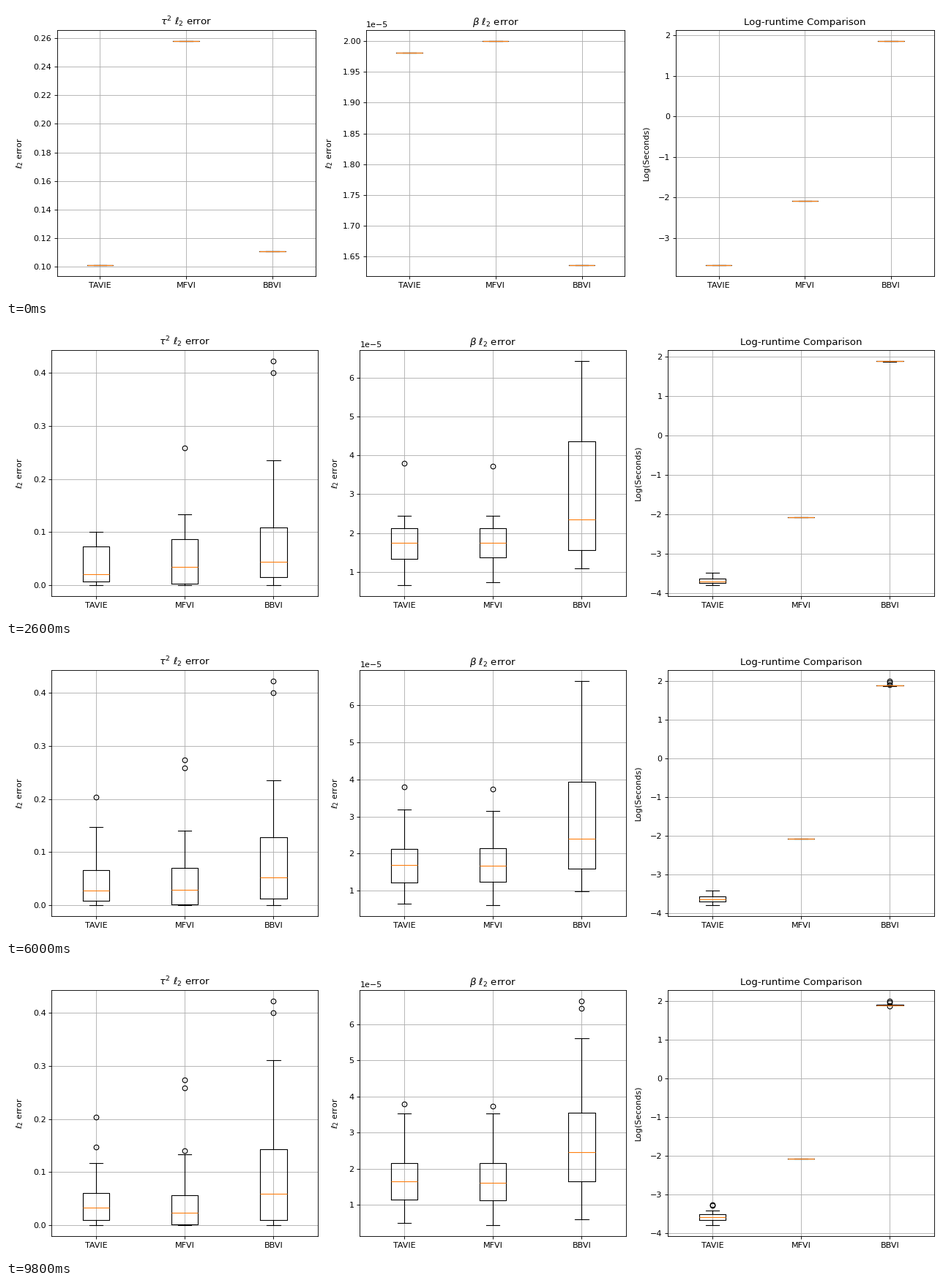
Write a matplotlib script that moves like this. It is 1280 px wide and 400 px high and loops after 10 s.

```python
import matplotlib.pyplot as plt
import numpy as np
from matplotlib.animation import FuncAnimation

FRAMES, INTERVAL = 50, 200
SPREAD_FRAMES = 5  # time a box takes to open up from its first draw
METHODS = ["TAVIE", "MFVI", "BBVI"]

# Each series: first draw, quartiles once opened, quartiles at the end,
# and the extreme draws that arrive on the way as {frame: value}.
TAU = [
    (.1011, (.0055, .016, .078), (.0094, .0325, .061),
     {4: .0002, 17: .2035, 22: .1474, 34: .1163}),
    (.258, (.003, .040, .1005), (.0014, .0228, .0561),
     {3: .1095, 4: .0002, 8: .1329, 17: .2742, 22: .1401}),
    (.111, (.0173, .0375, .0938), (.0091, .0588, .1437),
     {3: .400, 4: .0035, 8: .0005, 9: .4225, 11: .2346, 34: .2854, 43: .3108}),
]
BETA = [
    (1.9815, (1.42, 1.775, 2.10), (1.142, 1.65, 2.152),
     {2: 1.10, 3: 2.138, 4: 3.80, 8: .655, 10: 2.443, 19: 3.191, 34: 3.52, 44: .486}),
    (2.0005, (1.459, 1.80, 2.11), (1.132, 1.602, 2.152),
     {2: 1.117, 3: 2.147, 4: 3.733, 8: .73, 10: 2.443, 16: .618, 19: 3.142,
      34: 3.53, 44: .437}),
    (1.6357, (1.529, 2.3, 4.72), (1.64, 2.463, 3.54),
     {2: 1.08, 4: 6.44, 16: .98, 21: 6.645, 35: .697, 39: 5.614, 44: .593}),
]
RUNTIME = [
    (-3.667, (-3.78, -3.76, -3.68), (-3.655, -3.585, -3.515),
     {1: -3.79, 9: -3.47, 18: -3.41, 33: -3.26, 36: -3.285}),
    (-2.075, (-2.075,) * 3, (-2.075,) * 3, {}),
    (1.864, (1.87, 1.872, 1.875), (1.89, 1.897, 1.907),
     {4: 1.885, 20: 1.972, 23: 1.92, 28: 2.007}),
]

ERROR = r"$\ell_2$ error"
PANELS = [
    (TAU, 1, r"$\tau^2$ $\ell_2$ error", ERROR),
    (BETA, 1e-5, r"$\beta$ $\ell_2$ error", ERROR),
    (RUNTIME, 1, "Log-runtime Comparison", "Log(Seconds)"),
]


def mix(a, b, t):
    return np.asarray(a) * (1 - t) + np.asarray(b) * t


def quartiles(first, opened, final, frame):
    if frame <= SPREAD_FRAMES:
        return mix([first] * 3, opened, frame / SPREAD_FRAMES)
    progress = (frame - SPREAD_FRAMES) / (FRAMES - 1 - SPREAD_FRAMES)
    return mix(opened, final, progress ** 0.7)  # settles as draws accumulate


def box_stats(series, frame, scale, label):
    first, opened, final, extremes = series
    q1, med, q3 = quartiles(first, opened, final, frame)
    draws = np.array([first] + [v for f, v in extremes.items() if f <= frame])
    reach = 1.5 * (q3 - q1) + 1e-9
    inside = (draws >= q1 - reach) & (draws <= q3 + reach)
    whiskers = [q1, q3, *draws[inside]]
    return dict(label=label, q1=q1 * scale, med=med * scale, q3=q3 * scale,
                whislo=min(whiskers) * scale, whishi=max(whiskers) * scale,
                fliers=draws[~inside] * scale)


fig, axes = plt.subplots(1, 3, figsize=(16, 5), dpi=80)


def update(frame):
    for ax, (group, scale, title, ylabel) in zip(axes, PANELS):
        ax.clear()
        ax.bxp([box_stats(s, frame, scale, m) for s, m in zip(group, METHODS)])
        ax.set_title(title)
        ax.set_ylabel(ylabel, labelpad=10)
        ax.grid(True)
    fig.tight_layout()


anim = FuncAnimation(fig, update, frames=FRAMES, interval=INTERVAL,
                     repeat=True, repeat_delay=0)
plt.show()
```
